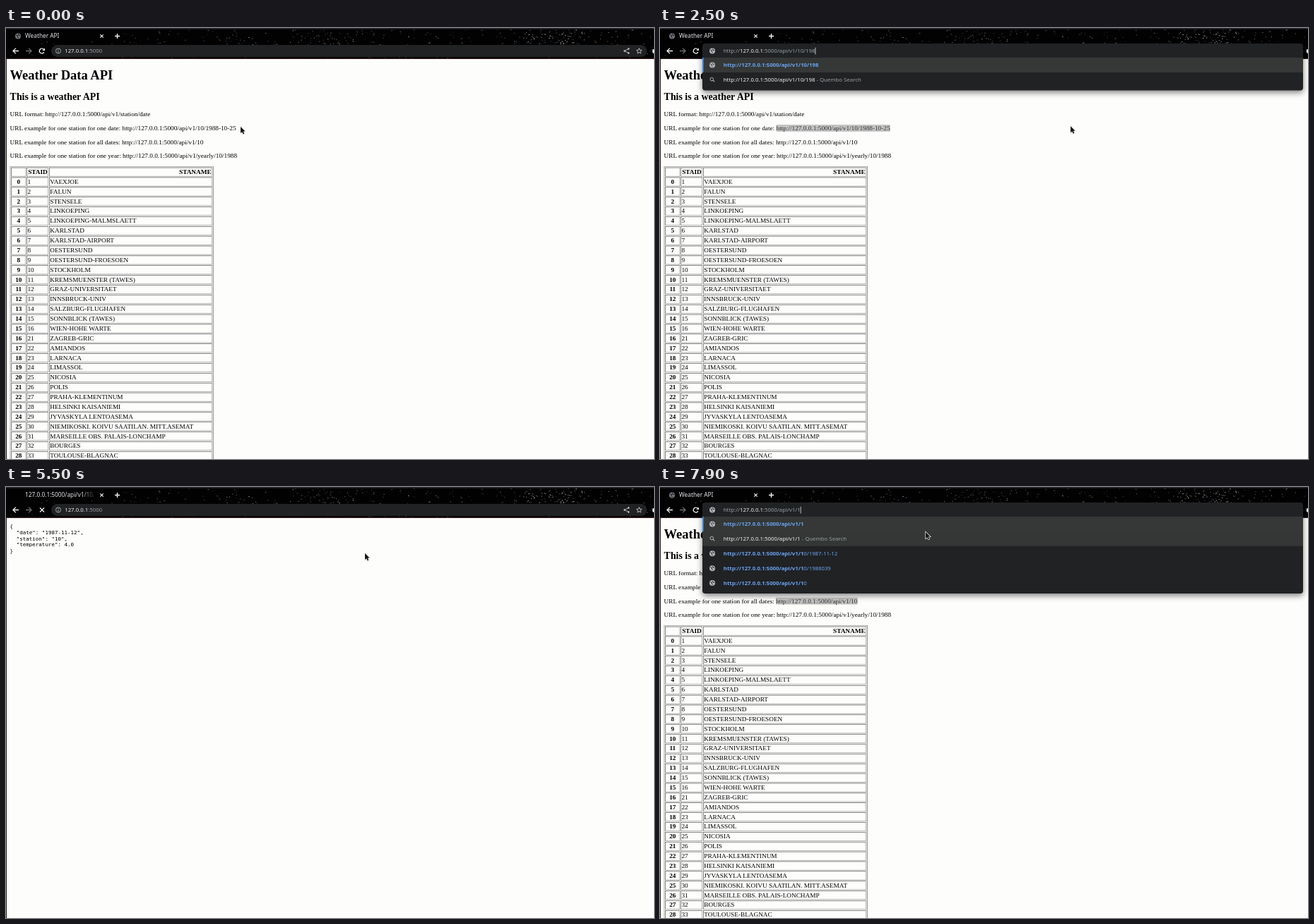
An HTML page with a canvas for the animation above (8000 ms loop, 917 px wide and 611 px high).

```html
<!DOCTYPE html>
<html lang="en">
<head>
<meta charset="utf-8">
<title>Weather API</title>
<style>
html, body { margin: 0; width: 100%; height: 100%; overflow: hidden; background: #fdfdfc; }
#view { position: absolute; left: 1px; top: 43.6px; width: 916px; height: 567.4px; overflow: hidden; }
.page { position: absolute; left: .2px; top: 0; width: 1570px; padding: 0 8px; transform: scale(.578); transform-origin: 0 0;
  font: 16px/18px "Liberation Serif", "Times New Roman", serif; color: #000; white-space: nowrap; }
h1 { font-size: 32px; line-height: 37px; margin: 21.44px 0; }
h2 { font-size: 24px; line-height: 27px; margin: 19.92px 0; }
p { margin: 16px 0; }
table { width: 498px; table-layout: fixed; }
th, td { box-sizing: border-box; padding: 1px; }
thead { text-align: right; }
thead th { text-align: right; }
pre { font: 13px/15px "DejaVu Sans Mono", monospace; margin: 13px 0; }
mark { background: #c3c3c3; color: #323232; }
mark.live { background: #1e90ff; color: #fff; }
canvas { position: absolute; left: 0; top: 0; }
</style>
</head>
<body>
<div id="view">
  <div class="page" id="home">
    <h1>Weather Data API</h1>
    <h2>This is a weather API</h2>
    <p>URL format: http://127.0.0.1:5000/api/v1/station/date</p>
    <p>URL example for one station for one date: <span id="dateUrl"></span></p>
    <p>URL example for one station for all dates: <span id="allUrl"></span></p>
    <p>URL example for one station for one year: http://127.0.0.1:5000/api/v1/yearly/10/1988</p>
    <table border="1">
      <thead><tr><th style="width:36px">&nbsp;</th><th style="width:53px">STAID</th><th>STANAME</th></tr></thead>
      <tbody id="rows"></tbody>
    </table>
  </div>
  <div class="page" id="json"><pre>{
  "date": "1987-11-12",
  "station": "10",
  "temperature": 4.0
}</pre></div>
</div>
<canvas id="c" width="917" height="611"></canvas>
<script>
const $ = id => document.getElementById(id);
const ctx = $('c').getContext('2d');
const HOST = 'http://127.0.0.1:5000';
const API = HOST + '/api/v1/10';
const SANS = '"Noto Sans", "Open Sans", sans-serif';
const GREY = '#9aa0a6', WHITE = '#f1f3f4', BLUE = '#6aa5f5', BAR = '#202224';

const stations = `VAEXJOE,FALUN,STENSELE,LINKOEPING,LINKOEPING-MALMSLAETT,KARLSTAD,KARLSTAD-AIRPORT,
OESTERSUND,OESTERSUND-FROESOEN,STOCKHOLM,KREMSMUENSTER (TAWES),GRAZ-UNIVERSITAET,INNSBRUCK-UNIV,
SALZBURG-FLUGHAFEN,SONNBLICK (TAWES),WIEN-HOHE WARTE,ZAGREB-GRIC,AMIANDOS,LARNACA,LIMASSOL,NICOSIA,
POLIS,PRAHA-KLEMENTINUM,HELSINKI KAISANIEMI,JYVASKYLA LENTOASEMA,NIEMIKOSKI. KOIVU SAATILAN. MITT.ASEMAT,
MARSEILLE OBS. PALAIS-LONCHAMP,BOURGES,TOULOUSE-BLAGNAC,CHATEAUROUX`.split(/,\s*/);
$('rows').innerHTML = stations.map((name, i) =>
  `<tr><th>${i}</th><td>${i < 16 ? i + 1 : i + 5}</td><td>${name}</td></tr>`).join('');

// Starry window frame, built once
const sky = document.createElement('canvas');
sky.width = 917; sky.height = 44;
{
  const g = sky.getContext('2d');
  let seed = 77;
  const rnd = () => (seed = (seed * 16807) % 2147483647) / 2147483647;
  const star = (x, y, a) => {
    g.fillStyle = `hsla(${rnd() < .5 ? 50 : 220},${rnd() * 60}%,80%,${a})`;
    g.fillRect(x, y, rnd() < .12 ? 1.6 : 1, 1);
  };
  g.fillStyle = '#020203';
  g.fillRect(0, 0, 917, 44);
  for (let i = 0; i < 330; i++) star(165 + rnd() * 752, 2 + rnd() * 41, .15 + rnd() * .6);
  for (let i = 0; i < 70; i++) star(782 + (rnd() + rnd() - 1) * 55, 2 + rnd() * 21, .3 + rnd() * .65);
  for (let i = 0; i < 35; i++) star(455 + (rnd() + rnd() - 1) * 50, 2 + rnd() * 21, .2 + rnd() * .5);
  for (let i = 0; i < 14; i++) star(rnd() * 165, 17 + rnd() * 25, .15 + rnd() * .3);
  g.fillStyle = '#25262b';
  g.fillRect(0, 0, 917, 1.6);
  g.fillStyle = '#2b1a18';
  g.fillRect(0, 42.6, 917, 1.4);
}

function line(color, width, ...paths) {
  ctx.strokeStyle = color;
  ctx.lineWidth = width;
  ctx.beginPath();
  for (const p of paths)
    for (let i = 0; i < p.length; i += 2) i ? ctx.lineTo(p[i], p[i + 1]) : ctx.moveTo(p[0], p[1]);
  ctx.stroke();
}
function dot(x, y, r, color) {
  ctx.fillStyle = color;
  ctx.beginPath();
  ctx.arc(x, y, r, 0, 7);
  ctx.fill();
}
function ring(x, y, r, color, width, from = 0, to = 7) {
  ctx.strokeStyle = color;
  ctx.lineWidth = width;
  ctx.beginPath();
  ctx.arc(x, y, r, from, to);
  ctx.stroke();
}
function box(x, y, w, h, r, color) {
  ctx.fillStyle = color;
  ctx.beginPath();
  ctx.roundRect(x, y, w, h, r);
  ctx.fill();
}
// parts: [text, colour, bold]; returns the end x
function label(x, y, size, ...parts) {
  for (const [s, color, bold] of parts) {
    ctx.font = `${bold ? 'bold ' : ''}${size}px ${SANS}`;
    ctx.fillStyle = color;
    ctx.fillText(s, x, y + size * .36);
    x += ctx.measureText(s).width;
  }
  return x;
}
function globe(x, y, color, hole) {
  dot(x, y, 4, color);
  line(hole, 1, [x - 2.8, y - 1.6, x - .4, y - .6, x - .8, y + 1, x + .6, y + 2.8], [x + .4, y - 3, x + 1, y - 1.2, x + 3, y - .6]);
}
const cross = (x, y, r, w) => line(WHITE, w, [x - r, y - r, x + r, y + r], [x + r, y - r, x - r, y + r]);

function arrowIcon(x, dir, color) {
  line(color, 1.3, [x - 4 * dir, 32.5, x + 4 * dir, 32.5], [x, 28.6, x + 4 * dir, 32.5, x, 36.4]);
}

function drawFrame(s) {
  ctx.drawImage(sky, 0, 0);
  ctx.fillStyle = '#2b1a18';
  ctx.fillRect(0, 44, 1, 567);

  if (!s.loading) globe(17, 11.5, '#73777b', '#0a0a0b');
  ctx.save();
  ctx.beginPath();
  ctx.rect(27, 2, 97, 20);
  ctx.clip();
  const fade = ctx.createLinearGradient(108, 0, 125, 0);
  fade.addColorStop(0, '#dfe1e5');
  fade.addColorStop(1, '#dfe1e522');
  label(27, 11.5, 8.3, [s.title, fade]);
  ctx.restore();
  cross(135.5, 11.5, 2.2, 1.2);
  line(WHITE, 1.4, [154, 11.5, 161, 11.5], [157.5, 8, 157.5, 15]);

  arrowIcon(14, -1, WHITE);
  arrowIcon(32, 1, '#6b6e72');
  if (s.loading) cross(51, 32.5, 3, 1.3);
  else {
    ring(50.8, 32.5, 3.4, WHITE, 1.3, .5, 5.6);
    ctx.fillStyle = WHITE;
    ctx.beginPath();
    ctx.moveTo(55, 28.4); ctx.lineTo(55, 32); ctx.lineTo(51.4, 32);
    ctx.fill();
  }
  dot(918, 33, 3.4, '#e8eaed');
}

function drawPill(s) {
  box(64, 24, 843, 17, 8.5, BAR);
  if (s.bar === 'focus') {
    ctx.strokeStyle = '#2a6bbd';
    ctx.lineWidth = 1.5;
    ctx.beginPath();
    ctx.roundRect(64.5, 24.3, 842, 16.6, 8.3);
    ctx.stroke();
  }
  ring(74, 32.5, 3.5, '#b4b8bc', .9);
  line('#b4b8bc', 1, [74, 32, 74, 34.6], [74, 30.2, 74, 31.1]);
  const path = s.url.slice(16);
  if (s.bar === 'focus') {
    ctx.font = `7.8px ${SANS}`;
    box(83, 27.4, ctx.measureText(s.url.slice(7)).width + .5, 10.6, 0, '#7fb0e6');
    label(83.2, 32.5, 7.8, [s.url.slice(7), '#17202b']);
  } else label(83.2, 32.5, 7.8, ['127.0.0.1', WHITE], [path, GREY]);

  line('#c4c7ca', .9, [881, 29.5, 875.3, 32.5, 881, 35.5]);
  for (const [x, y] of [[881, 29.6], [875.3, 32.5], [881, 35.4]]) dot(x, y, 1.25, '#c4c7ca');
  const star = [];
  for (let i = 0; i <= 10; i++) {
    const r = i % 2 ? 1.8 : 4, a = i * Math.PI / 5 - Math.PI / 2;
    star.push(896 + r * Math.cos(a), 32.7 + r * Math.sin(a));
  }
  line('#c4c7ca', .9, star);
}

function drawDrop(s, mouse) {
  const tails = s.tails || [];
  const rows = 2 + tails.length, bottom = 46.6 + rows * 20.9;
  ctx.save();
  ctx.shadowColor = 'rgba(0,0,0,.5)';
  ctx.shadowBlur = 9;
  ctx.shadowOffsetY = 3;
  box(60, 22, 850, bottom - 22, 4, BAR);
  ctx.restore();
  box(60, 42, 850, 20.9, 0, '#353836');
  const over = Math.floor((mouse.y - 42) / 20.9);
  if (over > 0 && over < rows && mouse.x < 910) box(60, 42 + over * 20.9, 850, 20.9, 0, '#343735');
  box(60, 42, 1.8, 20.9, 0, '#3f86e0');

  globe(74, 32.5, '#b4b8bc', BAR);
  const end = label(89.8, 32.5, 7.8, ['http://', GREY], ['127.0.0.1', WHITE], [s.url.slice(16), GREY]);
  if (s.caret) line('#d5d8db', .9, [end + .5, 27.8, end + .5, 37.5]);

  globe(74, 52.5, '#b4b8bc', '#353836');
  label(89.8, 52.5, 7.77, [s.url, BLUE, true]);
  ring(73.3, 72.6, 2.3, '#b4b8bc', 1);
  line('#b4b8bc', 1.1, [75, 74.2, 77.2, 76.4]);
  label(89.8, 73.4, 7.8, [s.url, WHITE], [' - Quembo Search', GREY]);
  tails.forEach((tail, i) => {
    const y = 94.3 + i * 20.9;
    globe(74, y, '#b4b8bc', BAR);
    label(89.8, y, 7.77, [s.url, BLUE, true], [tail, BLUE]);
  });
}

function drawMouse(m, beam) {
  ctx.save();
  ctx.translate(m.x, m.y);
  if (beam) {
    const shape = [[-2, -4.5, 2, -4.5], [0, -4.5, 0, 4.5], [-2, 4.5, 2, 4.5]];
    const dark = m.y < 44;
    line(dark ? '#333' : '#fff', 2.4, ...shape);
    line(dark ? '#d8d8d8' : '#111', 1, ...shape);
  } else {
    ctx.beginPath();
    [[0, 0], [0, 9], [2.1, 7.2], [3.7, 10.4], [5.2, 9.7], [3.7, 6.6], [6.5, 6.4]].forEach(p => ctx.lineTo(...p));
    ctx.closePath();
    ctx.strokeStyle = '#e8e8e8';
    ctx.lineWidth = 1.4;
    ctx.stroke();
    ctx.fillStyle = '#151515';
    ctx.fill();
  }
  ctx.restore();
}

// time, x, y
const path = [[0, 332, 140], [150, 327, 142], [600, 165, 142], [720, 165, 142], [960, 205, 34], [1200, 215.5, 37],
  [1700, 216, 37], [2700, 623, 151], [3850, 623, 151], [4200, 430, 95], [4600, 98, 33], [4850, 98, 33],
  [5400, 508, 94], [5700, 508, 94], [6150, 280, 162], [6700, 164, 162], [6850, 164, 162], [7200, 189, 30],
  [7450, 189, 30], [7800, 376, 64], [8000, 376, 64]];
function mouseAt(t) {
  const i = path.findIndex(p => p[0] > t), a = path[i - 1], b = path[i];
  let k = (t - a[0]) / (b[0] - a[0]);
  k = k * k * (3 - 2 * k);
  return { x: a[1] + (b[1] - a[1]) * k, y: a[2] + (b[2] - a[2]) * k };
}

function stateAt(t) {
  const json = t >= 4000 && t < 5650;
  const s = { json, loading: t >= 5400 && t < 5650, bar: 'idle', url: HOST,
    title: json ? '127.0.0.1:5000/api/v1/10/1987-11-12' : 'Weather API', caret: t < 3600 || t > 4000 };
  if (t >= 960 && t < 1100) s.bar = 'focus';
  else if (t >= 1100 && t < 4000) {
    s.bar = 'drop';
    const cut = Math.max(0, Math.min(7, Math.floor((t - 1600) / 100)));
    const typed = Math.max(0, Math.min(7, Math.floor((t - 2400) / 150)));
    s.url = API + '/' + (typed ? '1987-11-12'.slice(0, 3 + typed) : '1988-10-25'.slice(0, 10 - cut));
  } else if (json && t < 5400) {
    s.url = API + '/1987-11-12';
    if (t >= 4750) s.bar = 'focus';
    if (t >= 5050) { s.bar = 'drop'; s.url = HOST; }
  } else if (t >= 7200) {
    s.bar = t < 7600 ? 'focus' : 'drop';
    if (t >= 7600) s.url = API;
    if (t >= 7800) { s.url = API.slice(0, -1); s.tails = ['0/1987-11-12', '0/1988039', '0']; }
  }
  return s;
}

function setHtml(el, html) {
  if (el.last !== html) el.innerHTML = el.last = html;
}
// Selects text from its end; share 0..1
function select(el, text, share, live) {
  const n = Math.round(text.length * (1 - share));
  setHtml(el, text.slice(0, n) + (n < text.length ? `<mark${live ? ' class="live"' : ''}>${text.slice(n)}</mark>` : ''));
}
const share = (from, to, x) => Math.max(0, Math.min(1, (from - x) / (from - to)));

function draw(t) {
  const s = stateAt(t), m = mouseAt(t);
  $('home').style.display = s.json ? 'none' : '';
  $('json').style.display = s.json ? '' : 'none';
  const first = t < 150 || t >= 4000 ? 0 : t < 600 ? share(326, 165, m.x) : 1;
  const second = t < 6150 ? 0 : t < 6700 ? share(280, 164, m.x) : 1;
  select($('dateUrl'), API + '/1988-10-25', first, t < 960);
  select($('allUrl'), API, second, t < 7200);

  ctx.clearRect(0, 0, 917, 611);
  drawFrame(s);
  if (s.bar === 'drop') drawDrop(s, m);
  else drawPill(s);
  const onText = !s.json && ((Math.abs(m.y - 142) < 6 && m.x < 328) || (Math.abs(m.y - 162) < 6 && m.x < 282));
  drawMouse(m, (m.y > 24 && m.y < 41) || onText);
}

const start = performance.now();
function tick() {
  draw((performance.now() - start) % 8000);
  requestAnimationFrame(tick);
}
tick();
</script>
</body>
</html>
```
